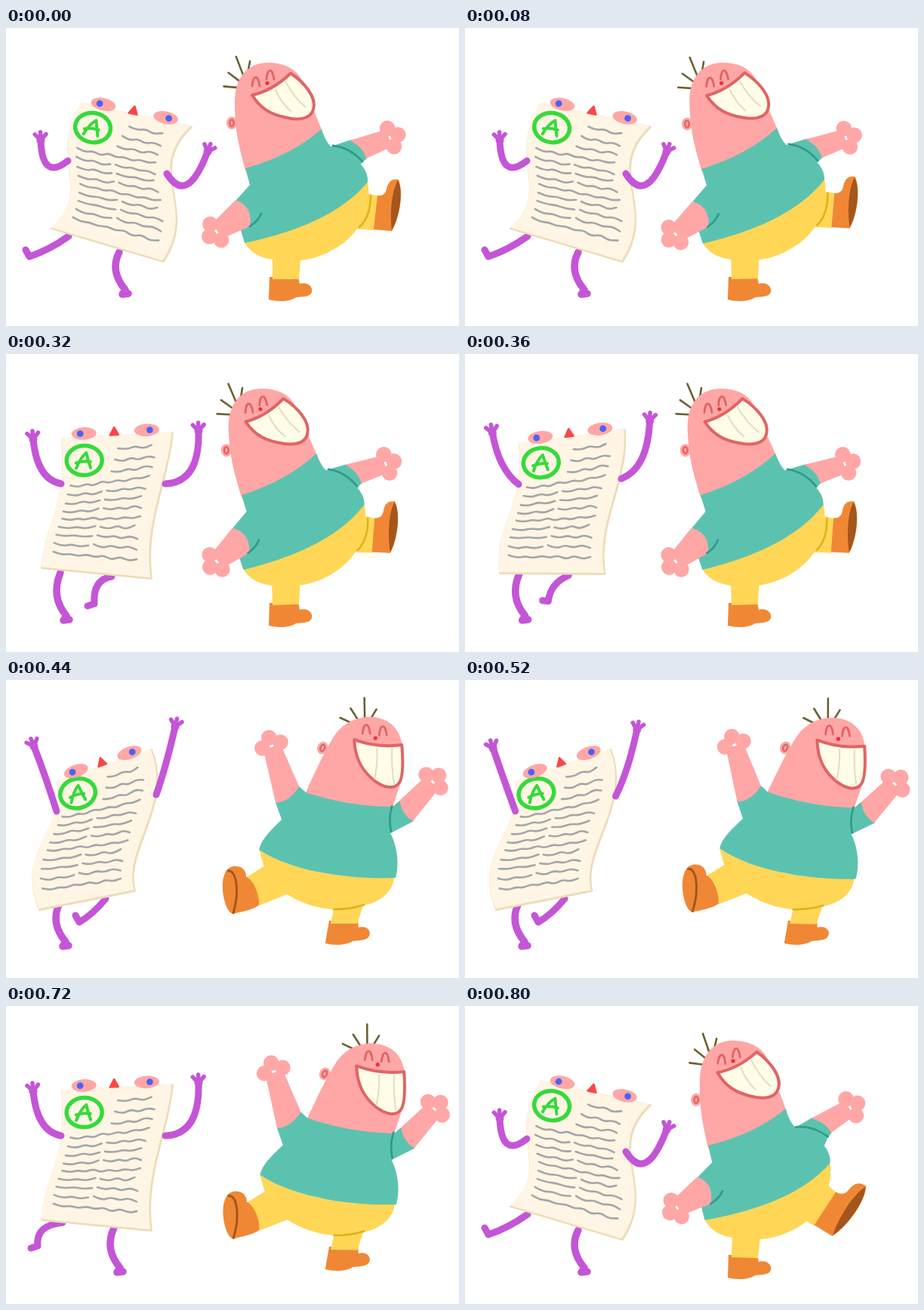
Write an HTML page that moves like this. It is 600 px wide and 395 px high and loops after 0.88 s.

```html
<!DOCTYPE html>
<html lang="en">
<head>
<meta charset="utf-8">
<title>Happy dance</title>
<style>
html, body { margin: 0; width: 100%; height: 100%; overflow: hidden; background: #fff; }
svg { display: block; width: 600px; height: 395px; }
path { stroke-linecap: round; stroke-linejoin: round; }
</style>
</head>
<body>
<svg id="stage" viewBox="0 0 600 395"></svg>
<script>
const LOOP = 880;
const STEPS = [0, 80, 160, 320, 360, 400, 440, 480, 520, 600, 720, 800];
const SKIN = '#ffa6a6', TEAL = '#5cc2b0', YELLOW = '#ffd656', ORANGE = '#f08735',
  BROWN = '#a4561d', RED = '#e06464', PURPLE = '#c455d6', BLUE = '#4a63f5', GREEN = '#35da3b';

const stage = document.getElementById('stage');
const clamp = v => Math.max(0, Math.min(1, v));
const polar = (x, y, a, r) => [x + r * Math.cos(a), y + r * Math.sin(a)];
const rad = deg => deg * Math.PI / 180;

const fill = (d, c) => `<path d="${d}" fill="${c}"/>`;
const line = (d, c, w) => `<path d="${d}" fill="none" stroke="${c}" stroke-width="${w}"/>`;
const dot = ([x, y], r, c) => `<circle cx="${x}" cy="${y}" r="${r}" fill="${c}"/>`;
const oval = (rx, ry, attrs) => `<ellipse rx="${rx}" ry="${ry}" ${attrs}/>`;
const place = (x, y, a, body) => `<g transform="translate(${x} ${y}) rotate(${a})">${body}</g>`;
const part = (name, body) => `<g data-part="${name}">${body}</g>`;

// ---------- the man ----------
const ear = (x, y, a) => place(x, y, a,
  oval(7, 8.5, `fill="${SKIN}"`) + oval(2.8, 4.5, `fill="none" stroke="${RED}" stroke-width="2.4"`));

const smile = (x, y) => line(`M${x} ${y}c1 -15 8 -16 10 0`, RED, 2.8);

// four hairs fan out from the rim of the head
const hair = (x, y, rim, dir) => [17, 18, 26, 12].map((len, i) => {
  const root = polar(x, y, rad(rim + 12.5 * i), 43);
  return line(`M${root}L${polar(...root, rad(dir + 32 * i), len)}`, '#6b6030', 2.6);
}).join('');

const boot = (x, y, slant) => `<g transform="translate(${x} ${y}) skewX(${slant})">` +
  fill('M0 0L38 -1L40 9C51 6 58 14 56 20C54 27 42 26 35 27C28 33 10 33 -1 30Z', ORANGE) + '</g>';

// a limb runs from the two ends of a cuff to a three-knobbed hand
function arm([x1, y1, x2, y2], [hx, hy], bulge) {
  const mx = (x1 + x2) / 2, my = (y1 + y2) / 2;
  const a = Math.atan2(hy - my, hx - mx);
  const side = Math.sign((y1 - my) * Math.cos(a) - (x1 - mx) * Math.sin(a)) * Math.PI / 2;
  const d = `M${x1} ${y1}L${polar(hx, hy, a + side, 12)}L${polar(hx, hy, a - side, 12)}` +
    `L${x2} ${y2}Q${polar(mx, my, a, -bulge)} ${x1} ${y1}Z`;
  return fill(d, SKIN) + [-78, 0, 78].map(k => dot(polar(hx, hy, a + rad(k), 13), 10.3, SKIN)).join('');
}

const man = m => m.boot + part('lean',
  part('leg', fill(m.shin, YELLOW) + fill(m.kick, ORANGE) + m.sole) +
  fill(m.pants, YELLOW) +
  part('fold', line(m.fold, '#dfb21c', 2.6)) +
  m.hair + m.ear + fill(m.head, SKIN) + m.eyes + dot(m.nose, 2.6, '#f52c35') +
  `<path d="${m.mouth}" fill="#fffce8" stroke="${RED}" stroke-width="4"/>` +
  line(m.teeth, '#dfdfc0', 2) +
  fill(m.shirt, TEAL) +
  part('armR', fill(m.sleeve, TEAL) + m.right + line(m.creaseR, '#2f9d8a', 2.8)) +
  part('armL', m.left) + line(m.creaseL, '#2f9d8a', 2.8));

const leftStance = {
  pivot: 350, shoulderR: [440, 160], shoulderL: [322, 240], knee: [490, 245],
  hair: hair(347, 90, -165, -175),
  ear: ear(299, 126, 0),
  head: 'M317 189C309 158 303 136 303 102C302 68 318 46 347 46C368 46 384 54 391 68L410 115L419 137L370 175Z',
  eyes: smile(326, 77) + smile(345, 68),
  nose: [346, 73],
  mouth: 'M326 89Q353 83 377 60C395 72 412 92 407 108C403 122 385 122 372 119C352 115 338 108 326 89Z',
  teeth: 'M357 82Q364 99 377 110M370 71Q382 93 397 105',
  shirt: 'M317 186Q378 169 418 134Q423 150 430 157L440 161C462 170 481 186 479 204Q434 260 316 285L311 268L324 262L304 229L323 208Z',
  sleeve: 'M428 158L457 148C470 151 480 161 481 170L471 179L462 192L432 180Z',
  creaseR: 'M433 156Q455 158 472 177',
  creaseL: 'M338 246Q334 256 323 263',
  right: arm([455, 149, 477, 173], [507, 146], -8),
  left: arm([304, 228, 323, 263], [280, 269], 17),
  pants: 'M316 284Q434 259 479 203C484 228 474 255 465 266C450 288 420 305 390 308L388 333L353 333L353 307Q326 303 316 284Z',
  fold: 'M483 222Q483 250 468 264',
  shin: 'M466 216L494 223L488 268L460 266Z',
  kick: 'M492 222C499 223 503 219 504 213C506 203 512 199 520 201C527 220 521 252 511 269L487 267Z',
  sole: fill('M519 202C511 215 508 246 511 268C521 252 527 215 519 202Z', BROWN),
  boot: boot(349, 330, 0)
};

const rightStance = {
  pivot: 430, shoulderR: [515, 180], shoulderL: [375, 155], knee: [328, 278],
  hair: hair(483, 92, -126, -155),
  ear: ear(419, 90, 20),
  head: 'M396 151C410 120 420 98 432 78C445 56 464 49 483 49C508 50 525 66 525 95L524 130L511 172L450 168Z',
  eyes: smile(472, 71) + smile(494, 73),
  nose: [489, 77],
  mouth: 'M461 79Q492 90 524 86C526 110 526 132 519 138C512 145 500 142 490 135C472 122 462 105 461 79Z',
  teeth: 'M491 91Q492 112 488 131M511 91Q510 116 514 137',
  shirt: 'M388 141L397 149Q450 167 512 168L521 160L540 187L509 203C516 216 522 240 516 262C460 265 380 255 335 225C338 210 352 198 365 185L357 163Z',
  sleeve: '',
  creaseR: 'M511 167Q506 184 510 201',
  creaseL: '',
  right: arm([521, 160, 539, 187], [564, 136], 8),
  left: arm([357, 163, 388, 141], [352, 89], 10),
  pants: 'M335 225C380 255 460 265 514 261C513 280 496 295 473 299L465 323L430 323L434 304C405 302 385 292 372 284L348 276L342 248Z',
  fold: 'M434 304Q456 304 474 298',
  shin: 'M318 262L343 246L380 276L372 284L335 299Z',
  kick: 'M318 261C318 252 312 247 303 247C285 248 284 275 290 295C294 307 298 312 305 309C318 306 330 303 335 298C336 285 328 265 318 261Z',
  sole: line('M294 253C306 253 309 282 301 309', BROWN, 3),
  boot: boot(428, 319, -8)
};

// ---------- the test paper ----------
// L, R: side curves; arms: shoulder, elbow, hand; kick: x, y, width, height, foot lift
const base = {
  L: [100, 100, 54, 172, 118, 215, 60, 265], R: [245, 131, 182, 190, 256, 238, 208, 309],
  armL: [82, 176, 48, 203, 46, 149], armR: [213, 193, 240, 236, 267, 164],
  stand: [150, 297], kick: [83, 276, 52, 27, 1]
};
const upright = {
  L: [74, 112, 82, 205, 54, 215, 47, 283], R: [220, 104, 215, 165, 182, 225, 192, 297],
  armL: [73, 172, 41, 166, 36, 113], armR: [211, 172, 257, 170, 255, 102],
  stand: [72, 290], kick: [140, 295, 23, 36, 0]
};
const swept = {
  L: [68, 134, 80, 200, 12, 225, 44, 304], R: [192, 92, 222, 165, 155, 225, 170, 279],
  armL: [67, 174, 52, 126, 37, 88], armR: [199, 152, 212, 115, 224, 62],
  stand: [71, 296], kick: [132, 290, 35, 31, 1]
};
const landed = { ...upright, stand: [143, 294], kick: [75, 287, 33, 31, 0] };

const mix = (a, b, t) => Object.fromEntries(
  Object.keys(a).map(k => [k, a[k].map((v, i) => v + (b[k][i] - v) * t)]));

function curve(p, t) {
  const s = 1 - t, w = [s * s * s, 3 * s * s * t, 3 * s * t * t, t * t * t];
  return [0, 1].map(i => w.reduce((sum, k, j) => sum + k * p[2 * j + i], 0));
}

let seed = 7;
const rand = () => (seed = seed * 16807 % 2147483647) / 2147483647;

function scribble(u0, u1, v) {
  const n = Math.round((u1 - u0) / .08);
  return Array.from({ length: n + 1 }, (_, i) =>
    [u0 + (u1 - u0) * i / n, v + (i % 2 ? 1 : -1) * (.004 + rand() * .012)]);
}

// three short rows beside the mark, then every fourth row runs the full width
const scribbles = [];
for (let i = 0; i < 12; i++) {
  const v = .085 + .0735 * i, end = .82 + rand() * .06, gap = .4 + rand() * .04;
  if (i < 3) scribbles.push(scribble(.51 - .02 * i, end, v));
  else if (i % 4 === 3) scribbles.push(scribble(.09, end, v));
  else scribbles.push(scribble(.08, gap, v), scribble(gap + .05, end, v));
}

function smooth(pts) {
  let d = 'M' + pts[0];
  for (let i = 1; i < pts.length - 1; i++) {
    const [x, y] = pts[i], [a, b] = pts[i + 1];
    d += `Q${x} ${y} ${(x + a) / 2} ${(y + b) / 2}`;
  }
  return d + 'L' + pts[pts.length - 1];
}

function thinArm([x, y, ex, ey, hx, hy]) {
  const a = Math.atan2(hy - ey, hx - ex);
  return line(`M${x} ${y}Q${ex} ${ey} ${hx} ${hy}`, PURPLE, 9) + dot([hx, hy], 5.5, PURPLE) +
    [-42, 0, 42].map(k => line(`M${hx} ${hy}L${polar(hx, hy, a + rad(k), 11)}`, PURPLE, 5.5)).join('');
}

const standLeg = ([x, y]) => line(`M${x} ${y}Q${x - 13} 322 ${x + 8} 347L${x + 4} 353L${x + 12} 352`, PURPLE, 9.5);

const kickLeg = ([x, y, w, h, lift]) => line(
  `M${x} ${y}Q${x - w * (1.1 - .6 * lift)} ${y + h * (.12 + .56 * lift)} ${x - w} ${y + h}` +
  `l${4 * lift - 9} ${3 - 12 * lift}`, PURPLE, 9);

function drawPaper(p, push) {
  const { L, R } = p;
  const at = (u, v, up = 0) => {
    const l = curve(L, v), r = curve(R, v);
    return [l[0] + (r[0] - l[0]) * u, l[1] + (r[1] - l[1]) * u - up].map(n => +n.toFixed(2));
  };
  const tilt = Math.atan2(R[1] - L[1], R[0] - L[0]) * 180 / Math.PI;
  const sheet = `M${L[0]} ${L[1]}L${R[0]} ${R[1]}C${R.slice(2)}L${L[6]} ${L[7]}` +
    `C${[L[4], L[5], L[2], L[3], L[0], L[1]]}Z`;
  const eye = (u, look) => place(...at(u, 0, 5), tilt,
    oval(16.5, 8.3, `fill="${SKIN}"`) + dot([look, 0], 4.4, BLUE));
  const mark = oval(23.5, 19.5, `fill="none" stroke="${GREEN}" stroke-width="5.5"`) +
    line('M-11 10Q-5 -4 3 -10Q5 0 8 10M-11 3Q-1 0 8 2', GREEN, 4);
  const nose = `<path d="M-5 3L1 -7L6 3Z" fill="#fb4646" stroke="#fb4646" stroke-width="2.5"/>`;
  const edge = '#ecdcb9', k = .03 * push;

  return standLeg(p.stand) + kickLeg(p.kick) +
    `<g transform="matrix(1 0 ${-k} 1 ${k * 110} 0)">` +
    `<path d="${sheet}" fill="${edge}" stroke="${edge}" stroke-width="2.8" transform="translate(.5 .6)"/>` +
    `<path d="${sheet}" fill="#fff5e4" transform="translate(-.6 -.8)"/>` +
    line(scribbles.map(s => smooth(s.map(q => at(...q)))).join(''), '#a3a6a9', 2.6) +
    place(...at(.2, .13), tilt * .7, mark) +
    thinArm(p.armL) + thinArm(p.armR) +
    eye(.2, -5) + eye(.77, 4) + place(...at(.47, 0, 4), tilt, nose) + '</g>';
}

// ---------- motion ----------
function paperAt(t) {
  if (t < 320 || t >= 800) return drawPaper(base, 0);
  if (t >= 720) return drawPaper(landed, 0);
  const bend = clamp((t - 320) / 120), push = clamp((t - 440) / 160);
  const pose = mix(upright, swept, bend);
  const { armL, armR } = mix(upright, swept, bend - .2 * push);
  return drawPaper({ ...pose, armL, armR }, push);
}

const stances = [leftStance, rightStance];
stage.innerHTML = '<g id="paper"></g>' + stances.map(m => `<g class="man">${man(m)}</g>`).join('');
const paper = document.getElementById('paper');
const men = [...document.querySelectorAll('.man')];

function poseMan(t) {
  const side = t >= 400 && t < 800 ? 1 : 0;
  const settle = clamp(1 - (t + 80) % LOOP / 240);
  const lean = side ? 8 - 12 * ((t - 600) / 200) ** 2 : 20 * settle ** 1.7 - 10;
  const free = side ? 0 : lean;
  const swing = Math.max(0, free) / 10;
  const { pivot, shoulderR, shoulderL, knee } = stances[side];
  men.forEach((m, i) => m.setAttribute('display', i === side ? 'inline' : 'none'));

  const set = (name, value, attr = 'transform') =>
    men[side].querySelector(`[data-part=${name}]`).setAttribute(attr, value);
  const shear = lean / 284, tilt = lean / 310;
  set('lean', `matrix(1 ${tilt} ${-shear} 1 ${shear * 330} ${-tilt * pivot})`);
  set('armR', `rotate(${-.45 * free - 9 * swing} ${shoulderR})`);
  set('armL', `rotate(${.4 * Math.min(0, free)} ${shoulderL})`);
  set('leg', `translate(${knee[0] - 15 * swing} ${knee[1] + 20 * swing}) rotate(${25 * swing}) ` +
    `scale(${1 + .16 * swing}) translate(${-knee[0]} ${-knee[1]})`);
  set('fold', 1 - swing, 'opacity');
}

let shown;
function draw(now) {
  const t = STEPS.filter(s => s <= now % LOOP).pop();
  if (t === shown) return;
  shown = t;
  paper.innerHTML = paperAt(t);
  poseMan(t);
}

const start = performance.now();
function tick() {
  draw(performance.now() - start);
  requestAnimationFrame(tick);
}
tick();
</script>
</body>
</html>
```
